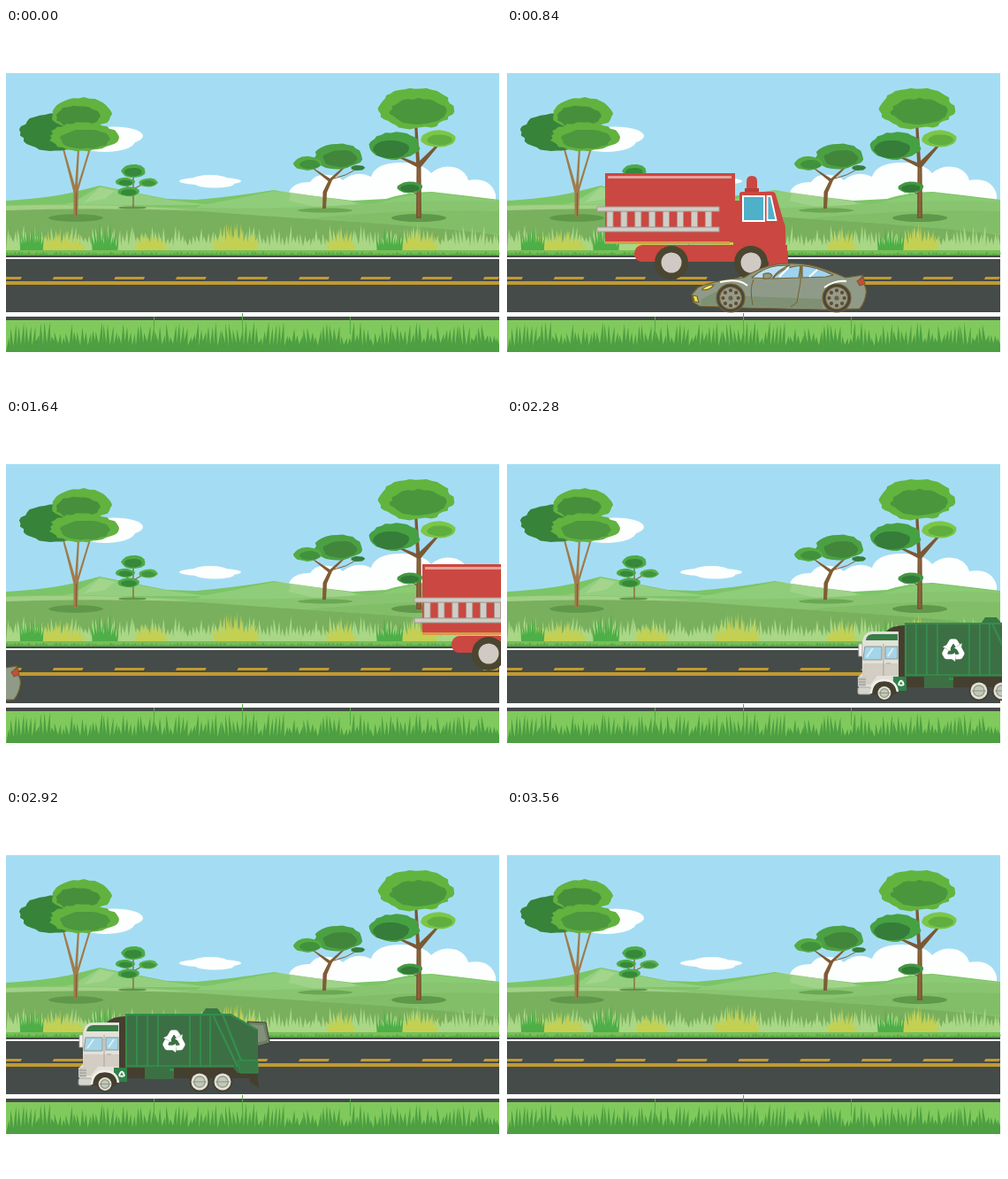
An HTML page for the animation above (3600 ms loop, 560x410 px).

```html
<!DOCTYPE html>
<html lang="en">
<head>
<meta charset="utf-8">
<title>Country road</title>
<style>
  html, body { margin: 0; width: 100%; height: 100%; overflow: hidden; background: #fff; }
  svg { display: block; width: 560px; height: 410px; }
</style>
</head>
<body>
<svg id="stage" viewBox="0 0 560 410"></svg>
<script>
let seed = 7;
const rnd = () => (seed = (seed * 16807) % 2147483647) / 2147483647;

const path = (d, fill, more = '') => `<path d="${d}" fill="${fill}" ${more}/>`;
const line = (d, color, w = 1) => path(d, 'none', `stroke="${color}" stroke-width="${w}" stroke-linejoin="round"`);
const rect = (x, y, w, h, fill, more = '') =>
  `<rect x="${x}" y="${y}" width="${w}" height="${h}" fill="${fill}" ${more}/>`;
const oval = (x, y, rx, ry, fill, more = '') =>
  `<ellipse cx="${x}" cy="${y}" rx="${rx}" ry="${ry}" fill="${fill}" ${more}/>`;
const group = (body, more) => `<g ${more}>${body}</g>`;
const repeat = (n, fn) => Array.from({ length: n }, (_, i) => fn(i)).join('');

// Leaf clump with an uneven edge
function clump(x, y, rx, ry, fill) {
  const n = Math.max(14, Math.round(rx));
  const d = repeat(n, i => {
    const a = i / n * 2 * Math.PI, k = 0.92 + rnd() * 0.12;
    return `${i ? 'L' : 'M'}${(x + rx * k * Math.cos(a)).toFixed(1)} ${(y + ry * k * Math.sin(a)).toFixed(1)}`;
  });
  return path(d + 'Z', fill);
}
// Lit clump with a darker core, shifted by a share of its size
const leaf = (x, y, rx, ry, rim, core, dx = 0, dy = 0.15) =>
  clump(x, y, rx, ry, rim) + clump(x + rx * dx, y + ry * dy, rx * 0.74, ry * 0.66, core);

// Row of pointed blades standing on a base line
function blades(x0, x1, base, low, high, step, fill) {
  let d = `M${x0} ${base}`;
  for (let x = x0; x < x1; x += step) {
    const h = low + rnd() * (high - low), lean = (rnd() - 0.5) * 4;
    const notch = low * (0.4 + rnd() * 0.4), end = Math.min(x + step, x1);
    d += `L${(x + step / 2 + lean).toFixed(1)} ${(base - h).toFixed(1)}L${end.toFixed(1)} ${(base - notch).toFixed(1)}`;
  }
  return path(d + `L${x1} ${base}Z`, fill);
}

// Fan of blades, tallest in the middle
function tuft(x, w, base, h, n, fill) {
  return path(repeat(n, i => {
    const u = (i + 0.5) / n * 2 - 1;
    const top = base - h * (1 - 0.5 * u * u) * (0.45 + rnd() * 0.55);
    const foot = x + u * w * 0.4;
    return `M${(foot - 2).toFixed(1)} ${base}L${(x + u * w / 2).toFixed(1)} ${top.toFixed(1)}L${(foot + 2).toFixed(1)} ${base}Z`;
  }), fill);
}

const WIDTH = 558;

function landscape() {
  const white = '#fdfefe';
  const clouds =
    oval(122, 122, 33, 10.5, white) + oval(112, 128, 34, 12, white) +
    oval(231, 173, 35, 4.5, white) + oval(231, 171, 20, 5, white) + oval(236, 176, 22, 4.5, white) +
    path('M320 196V186Q324 174 344 174Q350 164 366 166Q376 167 381 172Q396 160 413 168' +
         'Q418 152 447 152Q471 152 481 164Q493 153 510 158Q521 163 523 172Q548 168 554 188V198Z', white);

  const hills =
    path('M0 195Q50 192 78 185L106 178L182 193L215 194Q260 190 303 183L325 187L392 195L430 193Q455 185 482 185L558 194V256H0Z', '#7cc567') +
    path('M76 197L106 179L184 194L230 200H60Z', '#94cf80') +
    path('M88 197L106 180L123 184L112 193Z', '#a3d58d') +
    path('M222 200Q270 191 303 184L392 196L430 205H210Z', '#8fcd7a') +
    path('M303 183L322 187L320 195L350 202H400L392 196Z', '#a0d38a') +
    path('M425 197Q455 187 482 186L558 195V206H400Z', '#8bcb74') +
    path('M0 200Q90 197 180 202Q300 206 400 199Q480 193 558 196V256H0Z', '#89c570') +
    path('M0 201Q90 197 210 205Q100 204 0 207Z', '#a1d086') +
    path('M0 206Q110 202 220 207Q330 215 430 221Q500 225 558 234V256H0Z', '#79b05d') +
    path('M340 215Q460 204 558 207V233Q450 222 340 215Z', '#82be67');

  const shade = '#5f984a';
  const trees =
    oval(79, 214.5, 31, 4.2, shade) + oval(143, 203, 16, 1.6, shade) +
    oval(361, 206, 31, 2.6, '#6ba653') + oval(467, 214.5, 31, 4.5, shade) +
    path('M76.5 213L76.5 186L64 137H66L78 178L81 136H83L81 178L94 136H96L82 183L81 213Z', '#a17b4a') +
    line('M79.5 212V186', '#7d5c37', 1) +
    clump(53, 118, 37.5, 21, '#37833a') +
    leaf(85, 97, 34, 18.5, '#62b23f', '#488f3b', -0.12) +
    leaf(88, 123, 39, 16.5, '#62b23f', '#4d973f', 0.05) +

    line('M144 203V164M144 188L135 176M144 182L159 174', '#8a6a3c', 1.4) +
    leaf(144, 161.5, 14, 7.5, '#4caa45', '#37883a') + leaf(135, 174, 11, 5, '#4caa45', '#37883a') +
    leaf(161, 174.5, 11, 5, '#56b046', '#43943e') + leaf(139, 185, 12.5, 5.5, '#4caa45', '#37883a') +

    path('M358 204L358.5 185L364.5 173L346 158H347.500L366.500 170L385 154L386 155L369 172L363 186L362 204Z', '#7f5c35') +
    line('M371 170Q385 167 397 159', '#7f5c35', 1) +
    leaf(376, 145, 27, 14.5, '#4ba044', '#41863a', 0.08) +
    leaf(341, 153, 16, 8, '#54ab42', '#42913d', 0.15) +
    clump(398, 158, 8, 3, '#357d39') +

    path('M464 215L464.5 157L440 144L441 143L464 152L462 105H465L468 150L489 130L491 131L469.500 157L470 215Z', '#7b5833') +
    line('M467 213V158', '#9b7344', 1) + line('M465 188L457 182', '#7b5833', 1.2) +
    leaf(463, 91, 43.5, 23, '#61b53e', '#4a963d', 0.08) +
    leaf(440, 133, 28.5, 15.5, '#46a143', '#357d39', -0.15, 0.25) +
    leaf(489, 125, 20.5, 9.5, '#7cc646', '#5fae3f', 0.1) +
    leaf(457, 180, 14.5, 6.5, '#439840', '#327a38');

  const meadow =
    blades(0, WIDTH, 252, 14, 30, 4.2, '#a9d786') +
    [[60, 66, 26], [164, 40, 23], [260, 58, 36], [379, 36, 29], [468, 46, 33]]
      .map(([x, w, h]) => tuft(x, w, 251, h, Math.round(w / 2.4), '#c4d052')).join('') +
    [[29, 30, 30], [112, 34, 36], [434, 34, 36]]
      .map(([x, w, h]) => tuft(x, w, 251, h, 11, '#4eae47')).join('') +
    rect(0, 251, WIDTH, 6, '#77bf57') + blades(0, WIDTH, 257, 2, 5, 4, '#58a746');

  const road =
    rect(0, 257, WIDTH, 73, '#454b48') + rect(0, 259, WIDTH, 2, '#fff') +
    repeat(9, i => {
      const x = i * 69.6 - 17, end = Math.min(x + 35, WIDTH);
      return path(`M${x + 1.5} 281H${end}L${end - 1.5} 284H${x}Z`, '#c19a32');
    }) +
    rect(0, 286, WIDTH, 4, '#c19a32') + rect(0, 321, WIDTH, 5, '#fff');

  const verge =
    rect(0, 330, WIDTH, 36, '#80c95c') +
    blades(0, WIDTH, 366, 16, 35, 4.2, '#4d9f42') +
    line('M267.5 348V322M167.5 346V326M389.5 346V326', '#58a946', 1);

  return rect(0, 51, WIDTH, 315, '#a4ddf3') + clouds + hills + trees + meadow + road + verge;
}

function fireTruck() {
  const red = '#cb4741', pale = '#d0cdc6', edge = '#a39d94';
  const wheel = x => oval(x, 265, 19, 19, '#4a4630') + oval(x, 265, 11.5, 11.5, '#d0cac5');
  return rect(255, 164, 147, 78, red) + rect(258, 167, 140, 3, '#e3a199') +
    rect(400, 195, 12, 52, red) +
    path('M297 245H461V252L462 253V266Q461 269 458 269H440V264H296Q288 263 288 254Q289 246 297 245Z', red) +
    path('M407 188Q407 185 410 185H444Q447 185 448 188L457 219Q459 222 459 228V262H407Z', red) +
    rect(255, 241, 141, 3, '#d99a4b') +
    path('M415 181V173Q415 167 421 167Q427 167 427 173V181Z', red) + rect(413, 181, 16, 4, '#b93d39') +
    rect(411, 190, 24, 28, '#4fb0c9', 'stroke="#fff" stroke-width="2"') +
    path('M438.5 190H442.5L448.5 217H438.5Z', '#4fb0c9', 'stroke="#fff" stroke-width="1.8"') +
    repeat(8, i => rect(257 + i * 15.9, 207, 7, 18, pale, `stroke="${edge}" stroke-width=".8"`)) +
    [202, 225].map(y => rect(246, y, 138, 5, pale, `stroke="${edge}"`)).join('') +
    wheel(330) + wheel(420);
}

function sportsCar() {
  const ink = 'stroke="#77602f" stroke-width="1.2" stroke-linejoin="round"';
  const wheel = x =>
    oval(x, 305, 16, 16, '#46463f', ink) + oval(x, 305, 12.5, 12.5, '#969b8b', ink) +
    repeat(8, i => {
      const a = i * Math.PI / 4;
      return oval(x + 8.6 * Math.cos(a), 305 + 8.6 * Math.sin(a), 2.1, 2.1, '#5f4c32');
    }) + oval(x, 305, 2.6, 2.6, '#6d6041');
  return path('M53 301L60 293Q78 285 112 282Q132 269 149 267Q174 264 195 270Q214 276 227 282L247 279L243 284' +
      'Q250 289 250.5 298Q249 310 243 317L202 318L112 316L62 314L55 310Z', '#8f9b88', ink) +
    path('M64 306L80 298L115 303L200 306L201 317L112 315L63 313Z', '#7f9174') +
    path('M121 282Q135 270 150 268.500L164 268Q150 273 144 283Z', '#b7e0f7', ink) +
    path('M145 283Q155 270 176 268.500L174 282Z', '#9dd3f1', ink) +
    path('M178 268.500Q195 270 213 279L205 281L178 282Z', '#9dd3f1', ink) +
    line('M152 281L163 270M186 281L195 273', '#fff', 2) +
    line('M123 284Q118 294 122 313M177 268Q177 288 172 310L165 315', '#77602f', 1) +
    line('M85 287Q106 282 116 291', '#fff', 2) + line('M203 293Q216 284 228 286', '#fff', 2) +
    path('M134 278Q142 275 144 280Q141 284 134 283Z', '#8f9b88', ink) +
    path('M65 295Q70 290 78 290Q75 296 65 296Z', '#f4ee61', ink) +
    path('M54 302L59 303L61 310L56 309Z', '#e9df50', ink) +
    path('M240 286L247 281L249 289L243 291Z', '#cc4a3c', ink) +
    wheel(97) + wheel(217);
}

function garbageTruck() {
  const dark = '#453f2f', green = '#3c7044', rib = '#338f4d', pale = '#e3e1da';
  // Three bent arrows around a triangle
  const arrows = (x, y, k) => group(
    repeat(3, i => group(
      line('M-6.500 -2.500L-2 -10H2L5 -5.500', '#fff', 5.5) + path('M1 -3L9.500 -8L8.500 1.500Z', '#fff'),
      `transform="rotate(${i * 120})"`)),
    `transform="translate(${x} ${y}) scale(${k})"`);
  const wheel = (x, y, r) => oval(x, y, r, r, dark) + oval(x, y, r * 0.84, r * 0.84, '#e2e2d8') +
    oval(x, y, r * 0.55, r * 0.55, '#c3c7b9', 'stroke="#8d9682" stroke-width="1.2"') +
    line(`M${x - r * 0.7} ${y}H${x + r * 0.7}`, '#8d9682', 1);
  return rect(128, 288, 154, 15, dark) +
    path('M273 239L294 240L298.500 263L284 267Z', '#6b7d66', `stroke="${dark}"`) +
    path('M277 242L291 243L295 260L283 263Z', '#829179') +
    path('M273 296H284L286 314L276 307Z', dark) +
    path('M114 240Q120 233 136 233V292H120Z', dark) +
    path('M222 230L226 224H239L244 230Z', '#377844') +
    path('M135 230H254L285 248V297H262L257 291H135Z', green) +
    line('M135 231H254L284 248', rib, 2) + line('M135 289H258', rib, 1.6) +
    line('M136 230V290M148 231V290M160 231V290M172 231V290M208 231V290M220 231V290M231 231V290', rib, 1.8) +
    line('M234 231L262 290M245 231L266 283H285', rib, 2.2) +
    path('M262 283H285V297H265Z', '#397a47', `stroke="${rib}"`) +
    rect(157, 291, 33, 13, green) + rect(185, 292, 5, 3, rib) +
    arrows(190, 261.5, 1.02) +
    path('M87 252Q89 241 97 240H128V293H126V308H83V291L87 287Z', pale) +
    path('M91 250Q92 243 99 243H127V250Z', '#387d46') +
    path('M88 276H128V290H104L96 300H86Z', '#d3cdc3') +
    path('M90 257H109V272H88Z', '#a4d5e9', 'stroke="#8c9990"') +
    rect(113, 257, 14, 14, '#a4d5e9', 'stroke="#8c9990"') +
    line('M92 269L99 259M116 268L122 259', '#d9f0f8', 2) +
    line('M111 254V290M114 276H119', '#a8a59a', 1) +
    rect(83, 254, 4, 14, '#f3f2ed', 'stroke="#a8a59a" stroke-width=".8"') +
    rect(82, 291, 9, 11, '#c9cbc3') + line('M83 294H91M83 297H91M83 300H91', '#8e9389', 1) +
    rect(82, 303, 15, 8, '#d6d5cd', 'rx="2" stroke="#999b90" stroke-width=".8"') +
    rect(122, 291, 15, 16, '#318248') + arrows(131, 298.5, 0.3) +
    path('M97 311Q97 296 112 296Q125 296 127 309L122 312Z', dark) +
    line('M97 310Q98 295 112 295Q125 295 127 308', '#f1f0eb', 2.5) +
    path('M206 303Q207 294 219 294H245Q258 294 258 303Z', dark) +
    wheel(112, 309.5, 8.8) + wheel(219, 307, 11.3) + wheel(245, 307, 11.3);
}

// Each vehicle is drawn at the place it has at time `at`; speed in px per ms
const vehicles = [
  { draw: fireTruck, at: 1160, speed: 0.45 },
  { draw: sportsCar, at: 1160, speed: -0.4875 },
  { draw: garbageTruck, at: 2920, speed: -0.492 }
];

const stage = document.getElementById('stage');
stage.innerHTML = landscape() + vehicles.map(v => group(v.draw(), 'class="vehicle"')).join('');
const nodes = stage.querySelectorAll('.vehicle');

const LOOP = 3600, TICK = 40;
const start = performance.now();

function render() {
  const t = Math.floor((performance.now() - start) % LOOP / TICK) * TICK;
  vehicles.forEach((v, i) =>
    nodes[i].setAttribute('transform', `translate(${((t - v.at) * v.speed).toFixed(2)} 0)`));
  requestAnimationFrame(render);
}
render();
</script>
</body>
</html>
```
